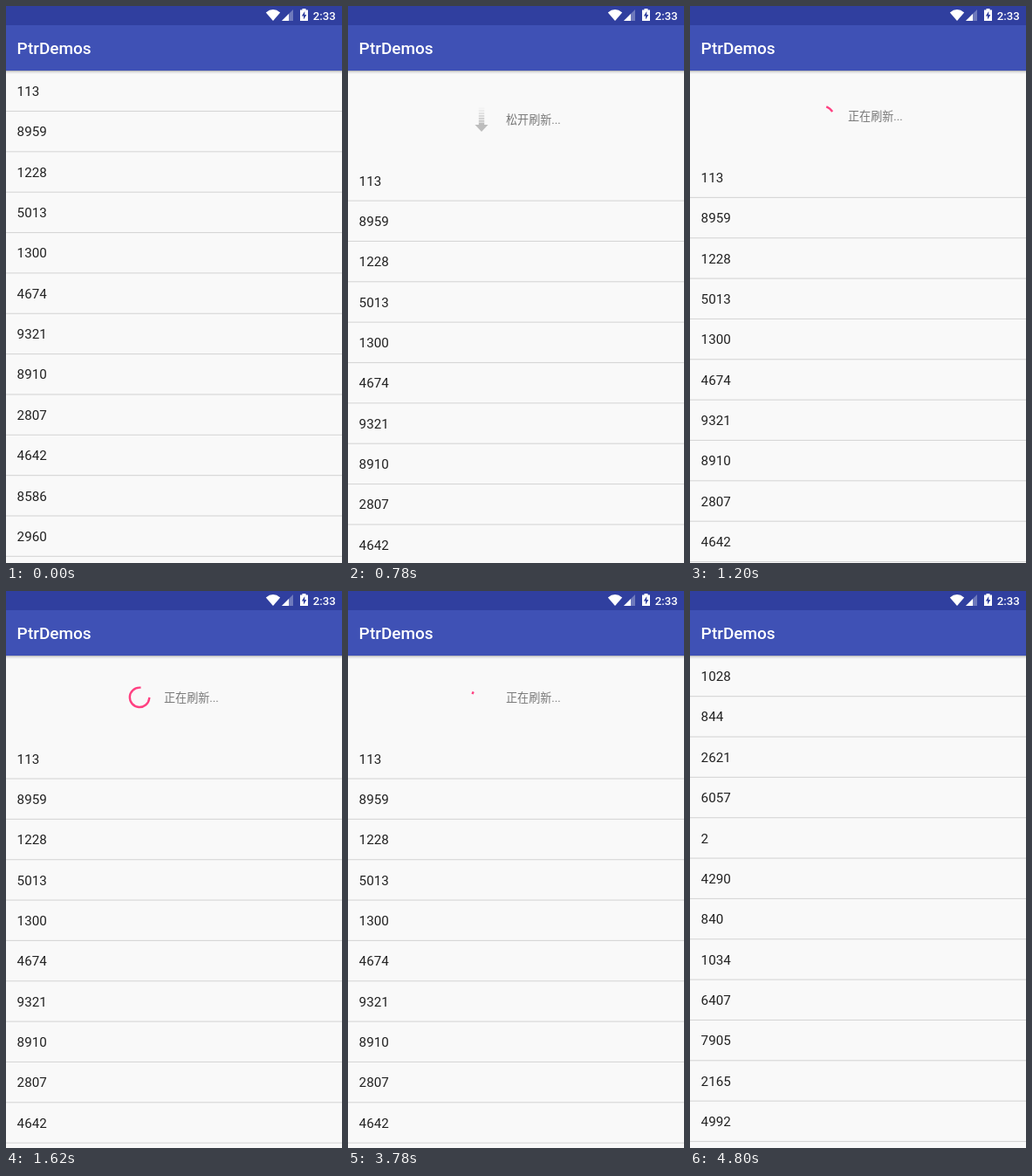
These frames come from a looping animation (385 by 638 pixels, 5.16 s). An HTML page:

```html
<!DOCTYPE html>
<html lang="zh">
<head>
<meta charset="utf-8">
<title>Pull to refresh</title>
<style>
  html, body { margin: 0; width: 100%; height: 100%; overflow: hidden; background: #f9f9f9; }
  svg { display: block; width: 385px; height: 638px; }
  text { font-family: Roboto, "Noto Sans CJK SC", "Noto Sans CJK", sans-serif; }
  .row { font-size: 15.2px; fill: #212121; }
  .tip { font-size: 13.1px; fill: #767676; }
  .bar { fill: #fff; font-weight: 500; }
</style>
</head>
<body>
<svg viewBox="0 0 385 638">
  <defs>
    <linearGradient id="shade" x1="0" y1="0" x2="0" y2="1">
      <stop offset="0" stop-color="#000" stop-opacity=".3"/>
      <stop offset=".4" stop-color="#000" stop-opacity=".1"/>
      <stop offset="1" stop-color="#000" stop-opacity="0"/>
    </linearGradient>
  </defs>
  <rect width="385" height="638" fill="#f9f9f9"/>

  <g id="content">
    <g transform="translate(153 -46.7)">
      <g id="arrow" fill="#bdbdbd">
        <path d="M-7.5 6H-3.2V3.6H3.2V6H7.5L0 14Z"/>
      </g>
      <path id="spinner" fill="none" stroke="#ff4081" stroke-width="2.4" stroke-linecap="square"/>
    </g>
    <text id="tip" class="tip" x="181" y="-41.8"></text>
    <g id="list"></g>
  </g>

  <rect y="74" width="385" height="4" fill="url(#shade)"/>
  <rect width="385" height="74" fill="#3f51b5"/>
  <rect width="385" height="22" fill="#303f9f"/>
  <text class="bar" x="12.6" y="55.3" font-size="19">PtrDemos</text>
  <text class="bar" x="351.8" y="15.8" font-size="13.2">2:33</text>
  <g fill="#fff">
    <path d="M297.8 7.4Q306 .8 314.2 7.4L306 17Z"/>
    <path d="M316 17H329V4Z" opacity=".3"/>
    <path d="M316 17H324V9Z"/>
    <path d="M337 4.5H339.5V3H343.5V4.5H346V17H337Z"/>
  </g>
  <path d="M342.3 6L338.8 11.4H341V15.4L344.4 10H342.3Z" fill="#303f9f"/>
</svg>

<script>
const LOOP = 5160, STEP = 60;
const TOP = 74, PITCH = 46.35, HEADER = 94.5;
const PULL = 540, ARMED = 775, RELEASE = 1070, DONE = 4075, CLOSE = 4550;
const SETTLE = 300, FLIP = 150;
const SPIN = 1333, TURN = 6665, RADIUS = 11.2;

const before = [113, 8959, 1228, 5013, 1300, 4674, 9321, 8910, 2807, 4642, 8586, 2960];
const after = [1028, 844, 2621, 6057, 2, 4290, 840, 1034, 6407, 7905, 2165, 4992];
const drag = [6, 25, 50, 77, 102.6, 125, 145, 162, 176.8];

const $ = id => document.getElementById(id);
const clamp = x => Math.min(1, Math.max(0, x));

function add(parent, tag, attrs) {
  const el = document.createElementNS("http://www.w3.org/2000/svg", tag);
  for (const k in attrs) el.setAttribute(k, attrs[k]);
  return parent.appendChild(el);
}

const rows = before.map((_, i) => {
  const y = i * PITCH;
  add($("list"), "rect", { x: 0, y: y + PITCH - 0.4, width: 385, height: 1.1, fill: "#d6d6d6" });
  return add($("list"), "text", { class: "row", x: 12.6, y: y + 29 });
});

// Fading stripes of the arrow's shaft
for (let i = 0; i < 6; i++) {
  add($("arrow"), "rect", { x: -3.2, y: 0.8 - i * 2.9, width: 6.4, height: 2, opacity: 0.85 - i * 0.15 });
}

// Fast start, long exponential tail
function fluid(x) {
  const f = v => v < 1 ? v - 1 + Math.exp(-v) : 1 - (1 - Math.exp(-1)) * Math.exp(1 - v);
  return f(8 * clamp(x)) / f(8);
}

// Cubic from (0,0) to (1,1), solved for x
function bezier(x1, y1, x2, y2) {
  const at = (a, b, s) => 3 * (1 - s) ** 2 * s * a + 3 * (1 - s) * s * s * b + s ** 3;
  return x => {
    let lo = 0, hi = 1;
    for (let i = 0; i < 24; i++) {
      const mid = (lo + hi) / 2;
      if (at(x1, x2, mid) < x) lo = mid; else hi = mid;
    }
    return at(y1, y2, lo);
  };
}
const grow = bezier(0.4, 0, 0.2, 1);
const headAt = p => p < 0.5 ? grow(p * 2) : 1;
const tailAt = p => p < 0.5 ? 0 : grow(p * 2 - 1);

function offsetAt(t) {
  if (t < PULL) return 0;
  if (t < RELEASE) return drag[Math.min(drag.length - 1, Math.floor((t - PULL) / STEP))];
  if (t < CLOSE) {
    const peak = drag[drag.length - 1];
    return peak + (HEADER - peak) * fluid((t - RELEASE) / SETTLE);
  }
  return HEADER * (1 - fluid((t - CLOSE) / SETTLE));
}

function arc(t) {
  const p = t % SPIN / SPIN;
  const base = t / TURN * 720 + p * 90;
  const from = base + 270 * tailAt(p);
  const to = Math.max(from + 0.5, base + 270 * headAt(p));
  const point = deg => {
    const a = deg * Math.PI / 180;
    return (RADIUS * Math.sin(a)).toFixed(3) + " " + (-RADIUS * Math.cos(a)).toFixed(3);
  };
  return `M${point(from)}A${RADIUS} ${RADIUS} 0 ${to - from > 180 ? 1 : 0} 1 ${point(to)}`;
}

function tipAt(t) {
  if (t < ARMED) return "下拉刷新...";
  if (t < RELEASE) return "松开刷新...";
  return t < DONE ? "正在刷新..." : "刷新完成";
}

function draw(t) {
  const busy = t >= RELEASE && t < DONE;
  const values = t < DONE ? before : after;
  $("content").setAttribute("transform", `translate(0 ${(TOP + offsetAt(t)).toFixed(2)})`);
  $("arrow").setAttribute("transform", `rotate(${-180 * clamp((t - ARMED - 5) / FLIP)})`);
  $("arrow").style.display = t < RELEASE ? "" : "none";
  $("spinner").style.display = busy ? "" : "none";
  if (busy) $("spinner").setAttribute("d", arc(t - RELEASE));
  $("tip").textContent = tipAt(t);
  rows.forEach((row, i) => { row.textContent = values[i]; });
}

const start = performance.now();
let shown = -1;
function tick() {
  const t = Math.floor((performance.now() - start) % LOOP / STEP) * STEP;
  if (t !== shown) draw(shown = t);
  requestAnimationFrame(tick);
}
tick();
</script>
</body>
</html>
```
